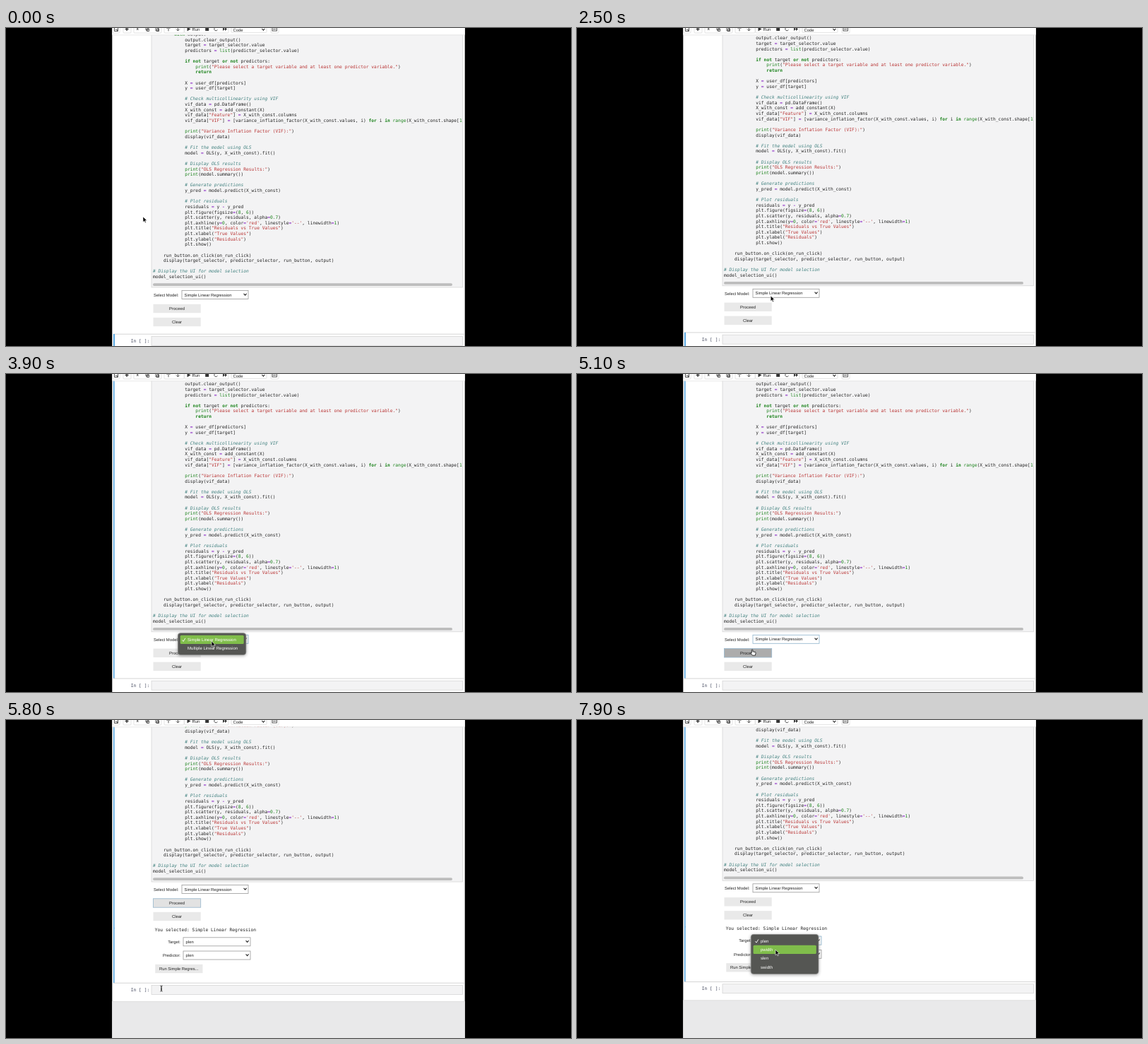
These frames come from a looping animation (800x450 px, 8 s). An HTML page:

```html
<!DOCTYPE html>
<html lang="en">
<head>
<meta charset="utf-8">
<title>Notebook model selection</title>
<style>
html, body { margin: 0; width: 100%; height: 100%; overflow: hidden; background: #000; }
svg { display: block; width: 800px; height: 450px; }
text { font: 5.85px "Liberation Sans", Arial, sans-serif; fill: #222; text-rendering: geometricPrecision; white-space: pre; }
.mono { font: 6.28px "DejaVu Sans Mono", monospace; }
.prompt { fill: #41465c; }
.com { fill: #40807f; font-style: italic; }
.str { fill: #b93434; }
.key { fill: #1a821a; font-weight: bold; }
.fn, .num { fill: #1a821a; }
.op { fill: #9a48cc; font-weight: bold; }
.mid { text-anchor: middle; }
.end { text-anchor: end; }
.paper { fill: #fff; }
.shade { fill: #dedede; }
.thumb { fill: #bdbdbd; }
.floor { fill: #e9e9ea; }
.box { fill: #f3f3f4; stroke: #d2d2d2; stroke-width: .7; }
.field { fill: #fff; stroke: #999; stroke-width: .8; }
.button { fill: #e9e9e9; }
.chevron { fill: none; stroke: #222; stroke-width: 1.1; }
.bar { fill: #5ba9e2; }
.rule { fill: #c4c4c4; }
.focus .field { stroke: #8db3cc; }
.focus .button { fill: #e2e2e2; stroke: #96b6cc; stroke-width: .8; }
.pressed .button { fill: #acacac; }
.menu { fill: #555653; stroke: #9a9a9a; stroke-width: .6; filter: drop-shadow(0 1px 2px rgba(0, 0, 0, .35)); }
.pick { fill: #80bd4b; }
.popup text { fill: #fff; font-size: 6px; }
.tick { fill: none; stroke: #fff; stroke-width: .9; }
.tools { fill: #333; }
.line { fill: none; stroke: #444; stroke-width: .9; }
.frame { fill: none; stroke: #d2d2d2; stroke-width: .6; }
.pointer path { fill: #000; stroke: #fff; stroke-width: .6; }
.pointer .hand { fill: #fff; stroke: #111; stroke-width: .8; }
.pointer .beam { fill: none; stroke: #222; stroke-width: .8; }
</style>
</head>
<body>
<svg id="stage" viewBox="0 0 800 450"></svg>
<script>
const code = `        with output:
            output.clear_output()
            target = target_selector.value
            predictors = list(predictor_selector.value)

            if not target or not predictors:
                print("Please select a target variable and at least one predictor variable.")
                return

            X = user_df[predictors]
            y = user_df[target]

            # Check multicollinearity using VIF
            vif_data = pd.DataFrame()
            X_with_const = add_constant(X)
            vif_data["Feature"] = X_with_const.columns
            vif_data["VIF"] = [variance_inflation_factor(X_with_const.values, i) for i in range(X_with_const.shape[1])]

            print("Variance Inflation Factor (VIF):")
            display(vif_data)

            # Fit the model using OLS
            model = OLS(y, X_with_const).fit()

            # Display OLS results
            print("OLS Regression Results:")
            print(model.summary())

            # Generate predictions
            y_pred = model.predict(X_with_const)

            # Plot residuals
            residuals = y - y_pred
            plt.figure(figsize=(8, 6))
            plt.scatter(y, residuals, alpha=0.7)
            plt.axhline(y=0, color='red', linestyle='--', linewidth=1)
            plt.title("Residuals vs True Values")
            plt.xlabel("True Values")
            plt.ylabel("Residuals")
            plt.show()

    run_button.on_click(on_run_click)
    display(target_selector, predictor_selector, run_button, output)

# Display the UI for model selection
model_selection_ui()`;

const token = /(?<com>#.*)|(?<str>"[^"]*"|'[^']*')|(?<key>\b(?:with|if|not|or|return|for|in)\b)|(?<fn>\b(?:print|list|range)\b)|(?<num>\b\d+(?:\.\d+)?\b)|(?<op>[=\-])/g;
const paint = line => line.replace(token, (m, ...rest) => {
  const groups = rest.at(-1);
  return `<tspan class="${Object.keys(groups).find(k => groups[k])}">${m}</tspan>`;
});

const text = (x, y, s, cls = "") => `<text x="${x}" y="${y}" class="${cls}">${s}</text>`;
const rect = (x, y, w, h, cls, r = 0) =>
  `<rect x="${x}" y="${y}" width="${w}" height="${h}" rx="${r}" class="${cls}"/>`;
const path = (d, cls) => `<path d="${d}" class="${cls}"/>`;

// Widgets are placed by their vertical centre.
const select = (id, x, y, w, s) => `<g id="${id}">${rect(x, y - 6, w, 12, "field")}
  ${text(x + 3.6, y + 2.2, s)}${path(`M${x + w - 6.4} ${y - 1.6}l2 2.2 2-2.2`, "chevron")}</g>`;
const button = (id, x, y, s) => `<g id="${id}">${rect(x, y - 6.2, 67.2, 12.4, "button")}
  ${text(x + 33.5, y + 2.1, s, "mid")}</g>`;

const popup = (id, x, y, w, items, pitch, indent) => {
  const rows = items.map((s, i) => text(x + indent, y + 11.4 + i * pitch, s)).join("");
  return `<g id="${id}" class="popup">${rect(x, y, w, items.length * pitch + 7, "menu", 4)}
    ${rect(x + 3.4, y + 3.2, w - 6.6, 12.2, "pick", 1.5)}
    ${path(`M${x + indent - 7.6} ${y + 9.8}l1.6 2 2.8-4.6`, "tick")}${rows}</g>`;
};

const codeLines = code.split("\n")
  .map((s, i) => text(208, 10.9 + i * 7.626, paint(s), "mono")).join("");

const frames = [[151, 10], [166, 11], [181, 39], [224, 28], [253, 62]]
  .map(([x, w]) => rect(x, -8, w, 15, "frame", 1)).join("");

const toolbar = `${rect(150, 0, 500, 9.6, "paper")}${rect(150, 9.6, 500, .7, "shade")}
  ${frames}<g class="tools">
  ${path("M153.5-1h5v5.6h-5z M154.8 2.4h2.6v2", "line")}
  ${rect(168.6, .8, 5, 1.4, "")}${rect(170.4, -1, 1.4, 5, "")}
  ${path("M184.5-1l3 4 M188-1l-3 4", "line")}
  ${path("M198-1h3v4h-3z M199.5 1h3v3.6h-3z", "line")}
  ${path("M212-1h3.6v5H212z M213.6 1h3v3.6h-3z", "line")}
  ${path("M230 4.4v-6 M227.6 1l2.4-2.4L232.4 1", "line")}
  ${path("M243.4-2v6 M241 1.6l2.4 2.4 2.4-2.4", "line")}
  ${path("M256.5-1.4l5 2.9-5 2.9z", "")}${text(263.6, 3.6, "Run")}
  ${rect(282.2, -1, 5, 5, "")}
  ${path("M299.4 2.4a2.4 2.4 0 1 1-.4-2.6", "line")}
  ${path("M307-1l3 2.5-3 2.5z M310-1l3 2.5-3 2.5z", "")}</g>
  ${rect(319, -6, 50, 12.4, "frame", 1)}${text(321.6, 4.5, "Code")}
  ${path("M362.4 1l2 2.2 2-2.2", "chevron")}
  ${rect(375, -6, 11, 13, "frame", 1)}${rect(377, -.5, 6.4, 4.5, "line")}
  ${path("M378.2 1.6h4", "line")}`;

const pointers = {
  arrow: "M0 0V7.7L1.8 6.1 3 8.8 4.3 8.2 3.1 5.6H5.6Z",
  hand: "M-1.6-3.4c0-1.2 1.5-1.2 1.5 0v2.2l3.3.8c.8.2 1 .8.8 1.6l-.6 3H-.6L-3 1.1c-.6-1 .4-1.5 1.4-.4z",
  beam: "M-1.6-4Q0-4 0-3V3Q0 4-1.6 4M1.6-4Q0-4 0-3V3Q0 4 1.6 4M-1 .9H1"
};

document.getElementById("stage").innerHTML = `
<clipPath id="page"><rect x="150.3" y="0" width="499.4" height="450"/></clipPath>
<clipPath id="cell"><rect x="206" y="-20" width="440.6" height="390"/></clipPath>
<g clip-path="url(#page)">
  ${rect(150, 0, 500, 450, "paper")}
  <g id="scroll">
    ${rect(206, -20, 440.6, 387, "box")}
    <g clip-path="url(#cell)">${codeLines}</g>
    ${rect(208, 361.2, 424, 3.8, "thumb", 1.9)}
    ${text(209, 379.9, "Select Model:")}
    ${select("model", 249, 377.5, 94, "Simple Linear Regression")}
    ${button("proceed", 208.5, 397, "Proceed")}
    ${button("clear", 208.5, 416, "Clear")}
    <g id="result">
      ${text(210.8, 436.6, "You selected: Simple Linear Regression", "mono")}
      ${text(247, 454.2, "Target:", "end")}${select("target", 251, 451.8, 95, "plen")}
      ${text(247, 473.4, "Predictor:", "end")}${select("predictor", 251, 471, 95, "plen")}
      ${button("run", 211.3, 490, "Run Simple Regres...")}
    </g>
    <g id="upperBar">${rect(152, -20, 1.6, 453, "bar")}
      <g id="barTail">${rect(152, 432, 1.6, 78, "bar")}</g></g>
    <g id="next">
      ${rect(152, 432.8, 498, .7, "rule")}
      <g id="lowerBar">${rect(152, 433, 2, 20, "bar")}</g>
      ${text(176.8, 445, "In [ ]:", "mono prompt")}
      ${rect(206, 436.4, 440.6, 13, "box")}
      ${rect(150, 459.4, 500, 200, "floor")}${rect(150, 459, 500, 1, "shade")}
    </g>
  </g>
  ${toolbar}
  ${popup("modelMenu", 243.3, 366.6, 96.6, ["Simple Linear Regression", "Multiple Linear Regression"], 12, 13.8)}
  ${popup("targetMenu", 246.2, 303.3, 95.8, ["plen", "pwidth", "slen", "swidth"], 12.3, 13.8)}
  <g id="pointer" class="pointer">
    ${Object.entries(pointers).map(([k, d]) => `<g id="${k}">${path(d, k)}</g>`).join("")}
  </g>
</g>`;

const el = id => document.getElementById(id);
const show = (id, on) => { el(id).style.display = on ? "" : "none"; };
const move = (node, x, y) => node.setAttribute("transform", `translate(${x} ${y})`);
const between = (t, a, b) => t >= a && t < b;

// Each track is a list of [time, ...values], eased between entries.
function sample(track, t) {
  const i = track.findIndex(k => k[0] > t);
  if (i < 0) return track.at(-1).slice(1);
  const [a, b] = [track[i - 1], track[i]];
  const u = (t - a[0]) / (b[0] - a[0]), e = u * u * (3 - 2 * u);
  return a.slice(1).map((v, j) => v + (b[j + 1] - v) * e);
}

const scrollTrack = [[0, 0], [100, 0], [400, -2.2], [5200, -2.2], [5700, -138], [5800, -138], [6000, -139.7]];
const pointerTrack = [
  [0, 194, 267], [900, 190, 303], [1300, 190, 303], [2400, 274, 379], [3300, 280, 376],
  [3900, 291, 378], [4200, 291, 378], [4800, 249, 394], [5200, 249, 394], [5700, 220, 380],
  [6400, 220, 380], [7000, 288, 313], [7300, 288, 313], [7700, 281, 325]
];

function draw(t) {
  const [scroll] = sample(scrollTrack, t);
  const [x, y] = sample(pointerTrack, t);
  const done = t >= 5200, upper = t >= 3300;
  move(el("scroll"), 0, scroll);
  move(el("next"), 0, done ? 77 : 0);
  move(el("pointer"), x, y);
  show("result", done);
  show("barTail", done);
  show("upperBar", upper);
  show("lowerBar", !upper);
  show("modelMenu", between(t, 3300, 4300));
  show("targetMenu", t >= 7100);
  move(el("targetMenu").querySelector(".pick"), 0, t >= 7500 ? 12.3 : 0);

  el("model").classList.toggle("focus", between(t, 3300, 5200));
  el("target").classList.toggle("focus", t >= 7100);
  el("proceed").classList.toggle("focus", between(t, 5000, 7100));
  el("proceed").classList.toggle("pressed", between(t, 5000, 5200));

  const kind = between(t, 4700, 5400) ? "hand" : between(t, 5400, 6600) ? "beam" : "arrow";
  for (const k in pointers) show(k, k === kind);
}

const start = performance.now();
function tick() {
  const t = (performance.now() - start) % 8000;
  draw(Math.floor(t / 100) * 100);
  requestAnimationFrame(tick);
}
tick();
</script>
</body>
</html>
```
